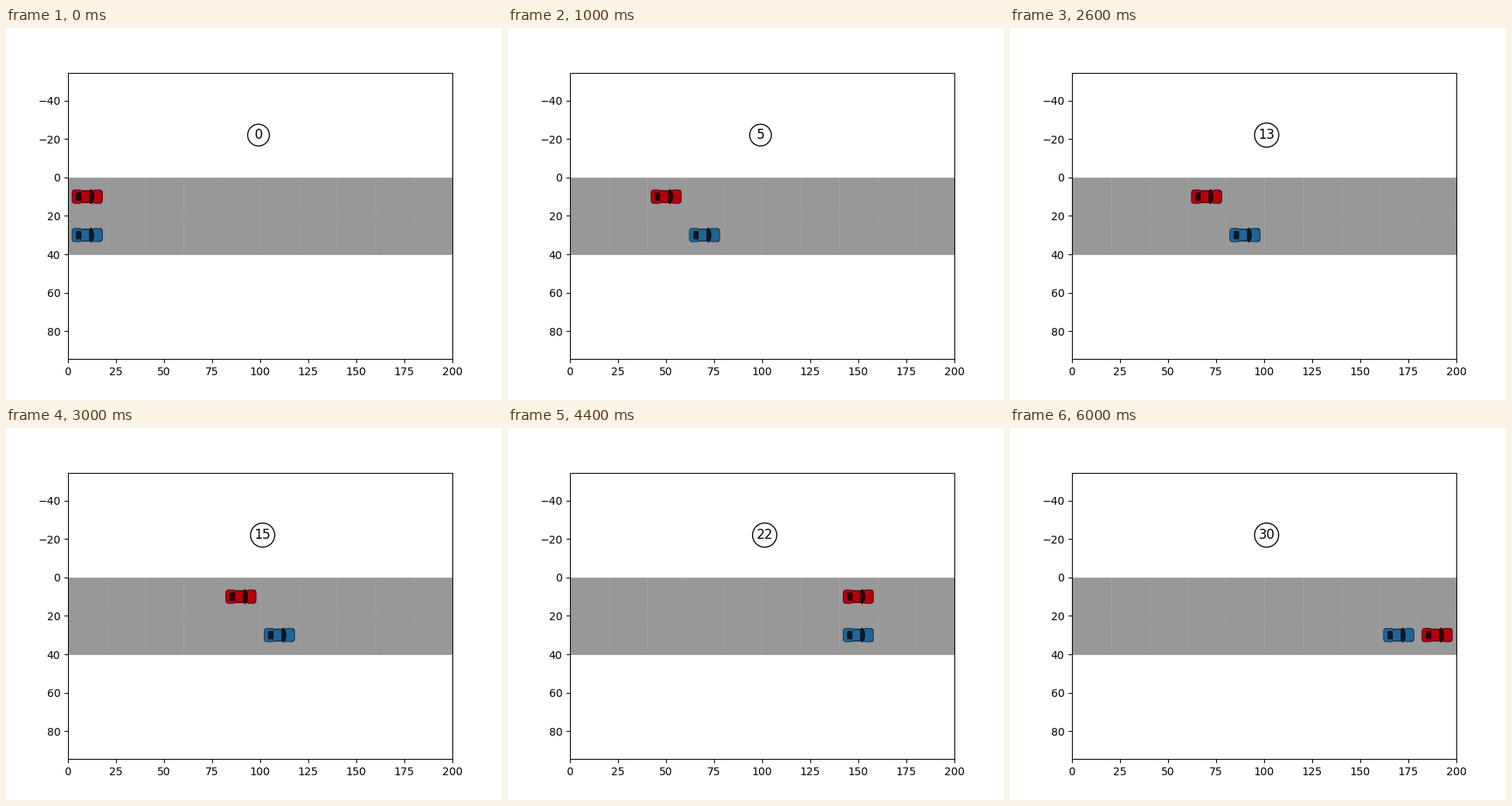
A matplotlib script for the animation above (6.2 s loop, 640 by 480 pixels).

```python
import matplotlib.pyplot as plt
from matplotlib.animation import FuncAnimation
from matplotlib.patches import Ellipse, FancyBboxPatch, Polygon, Rectangle
from matplotlib.transforms import Affine2D

STEPS = 31
CELL = 20
PX = 1 / 2.48  # data units per pixel

# Steps on which each car advances one cell; the cars take turns.
RED_MOVES = (2, 4, 8, 14, 16, 18, 22, 28, 30)
BLUE_MOVES = (1, 3, 5, 9, 15, 17, 19, 23)
MERGE_STEP = 30

fig, ax = plt.subplots(figsize=(6.4, 4.8), dpi=100)
half = 369.6 * PX / 2
ax.set_xlim(0, 200)
ax.set_ylim(20 + half, 20 - half)

for row in range(2):
    for col in range(10):
        ax.add_patch(Rectangle((col * CELL, row * CELL), CELL, CELL,
                               fc="#989898", ec="#a1a1a1", lw=0.6, zorder=1))

label = ax.text(97, -20, "0", fontsize=12,
                bbox=dict(boxstyle="circle", fc="white", ec="black"))


class Car:
    """Top view of a car heading right, laid out in pixels around its centre."""

    def __init__(self, paint, edge, glass):
        self.parts = []
        self.box(-14, 14, 8.3, 1, edge)
        for side in (-1, 1):
            self.add(Ellipse((5, side * 8.3), 2.6, 2.8, fc=edge, lw=0))
        self.box(-19.6, -6.5, 8.7, 4, paint, edge)
        self.box(6.5, 19.6, 8.7, 4, paint, edge)
        self.box(-9, 5, 6.9, 1, paint)
        self.poly([(-14.6, 4.2), (-13.6, 5.4), (-7.6, 5.4), (-7.6, 0)], glass)
        self.poly([(2.4, 7.4), (6.4, 8.2), (8.4, 5), (9, 0), (3.6, 0)], glass)
        for side in (-1, 1):
            self.poly_raw([(15.5, side * 8.2), (18.2, side * 7.2),
                           (19.3, side * 4.6), (17.6, side * 6.4)], edge)

    def add(self, patch):
        patch.set_zorder(3 + len(self.parts) / 100)
        ax.add_patch(patch)
        self.parts.append(patch)

    def box(self, x0, x1, h, r, fc, ec="none"):
        style = f"round,pad=0,rounding_size={r}"
        self.add(FancyBboxPatch((x0, -h), x1 - x0, 2 * h, boxstyle=style,
                                fc=fc, ec=ec, lw=0.6))

    def poly(self, pts, fc):
        self.poly_raw(pts + [(x, -y) for x, y in reversed(pts)], fc)

    def poly_raw(self, pts, fc):
        self.add(Polygon(pts, closed=True, fc=fc, lw=0))

    def place(self, col, row):
        x, y = (col + 0.5) * CELL, (row + 0.5) * CELL
        pose = Affine2D().scale(PX).translate(x, y) + ax.transData
        for part in self.parts:
            part.set_transform(pose)


red = Car("#b6000f", "#4a0207", "#230205")
blue = Car("#206595", "#0d2a40", "#091722")


def cells(moves, step):
    return sum(m <= step for m in moves)


def update(step):
    red.place(cells(RED_MOVES, step), int(step >= MERGE_STEP))
    blue.place(cells(BLUE_MOVES, step), 1)
    label.set_text(str(step))
    return red.parts + blue.parts + [label]


anim = FuncAnimation(fig, update, frames=STEPS, interval=200, repeat=True)
plt.show()
```
